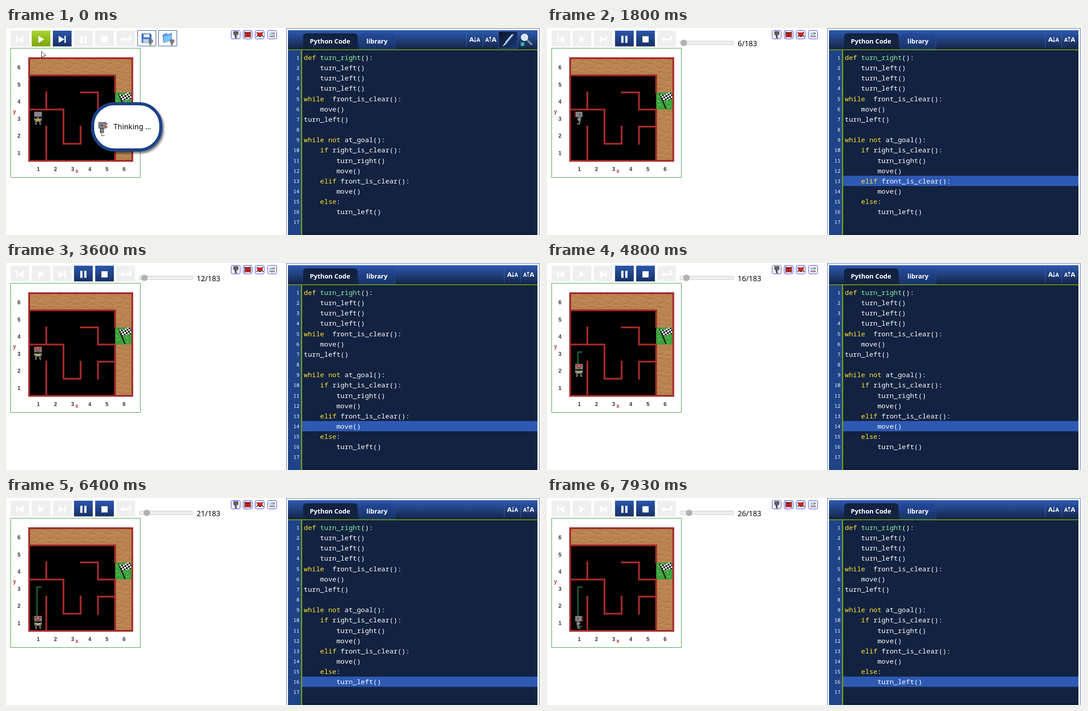
Animation of 1201 by 466 pixels, one loop 8 s. Source, as an HTML page:

```html
<!DOCTYPE html>
<html lang="en">
<head>
<meta charset="utf-8">
<title>Maze robot</title>
<style>
html, body { margin: 0; width: 100%; height: 100%; overflow: hidden; background: #fff; }
svg { display: block; }
text { white-space: pre; }
.ui { font-family: "Noto Sans", "Open Sans", sans-serif; font-size: 16.4px; fill: #000; }
.tab { font: bold 14.4px "Noto Sans", "Open Sans", sans-serif; fill: #fff; }
.code { font: 15.25px "Noto Sans Mono", "DejaVu Sans Mono", monospace; fill: #fff; }
.num { font: 11px "Noto Sans Mono", "DejaVu Sans Mono", monospace; fill: #fff; text-anchor: end; }
.axis { font: bold 12px "Liberation Sans", Arial, sans-serif; fill: #333; text-anchor: middle; }
.red { fill: #b03434; }
.kw { fill: #ffe135; }
.fn { fill: #90f0a0; }
.wall { fill: none; stroke: #a52a2a; stroke-width: 4; }
.size { font-family: "Noto Sans", "Open Sans", sans-serif; fill: #fff; font-weight: 600; }
</style>
</head>
<body>
<svg width="1201" height="466" viewBox="0 0 1201 466">
<defs>
  <linearGradient id="head" x2="0" y2="1"><stop stop-color="#2d5ab3"/><stop offset="1" stop-color="#122140"/></linearGradient>
  <linearGradient id="blue" x2="0" y2="1"><stop stop-color="#2a56ad"/><stop offset="1" stop-color="#173064"/></linearGradient>
  <linearGradient id="tab" x2="0" y2="1"><stop stop-color="#24499a"/><stop offset="1" stop-color="#183264"/></linearGradient>
  <linearGradient id="lime" x2="0" y2="1"><stop stop-color="#a9d52c"/><stop offset="1" stop-color="#7aa512"/></linearGradient>
  <linearGradient id="pen" x2="1" y2="1"><stop stop-color="#0b1226"/><stop offset="1" stop-color="#1b3a78"/></linearGradient>
  <filter id="shade" x="-20%" y="-20%" width="150%" height="150%"><feDropShadow dx="3" dy="4" stdDeviation="2.5" flood-color="#000" flood-opacity=".55"/></filter>
  <pattern id="dirt" width="38.5" height="38.5" patternUnits="userSpaceOnUse" x="52" y="68">
    <rect width="39" height="39" fill="#ba8551"/>
    <g fill="none" stroke="#a87342" stroke-width="2" stroke-linecap="round" opacity=".75">
      <path d="M2 7q5-4 9 1t8 0M20 13q6-5 13 1M4 20q7 5 13-2M22 25q5-4 12 1M3 32q6-5 11 0t9 1M27 34l7-3M27 5l6-2"/>
    </g>
    <g fill="none" stroke="#c8945f" stroke-width="1.5" opacity=".8"><path d="M3 11q6-3 11 1M22 17q6-4 11 0M6 25q6 3 11-2M24 29q5-3 10 0M12 36l8-2"/></g>
  </pattern>
  <pattern id="check" width="8" height="8" patternUnits="userSpaceOnUse" patternTransform="rotate(12)">
    <path d="M0 0h8v8H0z" fill="#fff"/><path d="M0 0h4v4H0zM4 4h4v4H4z" fill="#111"/>
  </pattern>
  <g id="front">
    <path d="M-6 1h13v7H-6z" fill="#777"/>
    <path d="M-7 0v6M8 0v6M-4 7v7M5 7v7" stroke="#999" stroke-width="2"/>
    <path d="M-6 13.5h4M4 13.5h4" stroke="#b5b5b5" stroke-width="1.6"/>
  </g>
  <g id="south">
    <use href="#front"/>
    <path d="M-8-14h17v12H-8z" fill="#858585" stroke="#4d4d4d"/>
    <circle cx="-3.5" cy="-10" r="2.4" fill="#f01818"/><circle cx="4.5" cy="-10" r="2.4" fill="#f01818"/>
    <path d="M-4-5h9" stroke="#333" stroke-width="1.6"/>
    <path d="M-5 2q5.5 5 11 0" fill="none" stroke="#e5d23c" stroke-width="2"/>
  </g>
  <g id="north">
    <use href="#front"/>
    <path d="M-8-14h17v11H-8z" fill="#858585" stroke="#555"/>
    <path d="M-2-2h5v2h-5z" fill="#888"/>
    <path d="M-4 4l4.5-3L5 4M-4 8l4.5-3L5 8" fill="none" stroke="#e5d23c" stroke-width="1.6"/>
  </g>
  <g id="west">
    <path d="M-2-2h7v9h-7z" fill="#666" stroke="#444"/>
    <path d="M-4 2h8M1 0v8" stroke="#aaa" stroke-width="1.4"/>
    <path d="M2 7v6h-6" fill="none" stroke="#929292" stroke-width="2.2"/>
    <path d="M-7-14H8v12H-7z" fill="#858585" stroke="#4d4d4d"/>
    <circle cx="2" cy="-8" r="1.6" fill="#333"/>
    <path d="M-10-11h3M-10-5h3" stroke="#e42525" stroke-width="2.2"/>
  </g>
  <g id="east"><use href="#west" transform="scale(-1 1)"/></g>
  <g id="down">
    <text class="size" x="0" y="31" font-size="15">A</text><path d="M13 20v11m-2.5-3l2.5 3 2.5-3" fill="none" stroke="#fff" stroke-width="1.2"/><text class="size" x="16.5" y="31" font-size="11.5">A</text>
    <text class="size" x="36" y="31" font-size="11.5">A</text><path d="M47 31V20m-2.5 3l2.5-3 2.5 3" fill="none" stroke="#fff" stroke-width="1.2"/><text class="size" x="50.5" y="31" font-size="15">A</text>
    <path d="M-6.5 10v34M30.5 10v34" stroke="#3a62b4"/>
  </g>
</defs>

<g id="bar"></g>

<g id="files">
  <g fill="#fff" stroke="#1f4388"><path d="M295.500 5.500h41v35h-41zM342.500 5.500h41v35h-41z"/></g>
  <path d="M305 13h19l2 2v18h-21z" fill="#3e78c9" stroke="#24519b"/><path d="M309 14h13v7h-13z" fill="#e8eef8"/><path d="M308 25h14v8h-14z" fill="#b9d3f2"/>
  <path d="M352 16l8-4 3 3 9-3v15l-18 6z" fill="#4c9ae0" stroke="#2a6db8"/><path d="M354 19l19-5-2 13-17 6z" fill="#7dc0f3"/>
  <use href="#east" transform="translate(325 34) scale(.55)"/><use href="#east" transform="translate(373 34) scale(.55)"/>
</g>

<g id="progress">
  <rect x="298" y="29.500" width="122" height="8" rx="4" fill="#efefef" stroke="#c8c8c8"/>
  <circle id="thumb" cy="33.500" r="7.300" fill="#b2b2b2"/>
  <text id="count" class="ui" x="428" y="41"></text>
</g>

<g id="chips">
  <g fill="#fff" stroke="#2222e0"><rect x="505.500" y="5.500" width="20" height="19" rx="3"/><rect x="532.500" y="5.500" width="20" height="19" rx="3"/><rect x="559.500" y="5.500" width="20" height="19" rx="3"/><rect x="587.500" y="5.500" width="20" height="19" rx="3"/></g>
  <path d="M511 8h10v7h-10z" fill="#666" stroke="#222"/><path d="M515 15v7h4M513 18h6" fill="none" stroke="#333" stroke-width="2"/>
  <path d="M537 9h11v12h-11z" fill="#d22"/><path d="M536 8v14M549 8v14M538 12h9M541 17h5" stroke="#222" stroke-width="2" stroke-dasharray="3 1"/>
  <path d="M564 10h12v8h-12z" fill="#d92222"/><path d="M562 10l3 2M577 9l-3 3M562 20l4-3M578 20l-4-3M567 19h6" stroke="#333" stroke-width="2"/>
  <path d="M591 11l11-3 2 4-4 3h-9z" fill="#9cc8dc"/><path d="M591 16h13v4h-13z" fill="#a6b8c4"/><path d="M592 20h11M599 14l5-2" stroke="#b85050" stroke-width="1.5"/>
</g>

<g id="world">
  <path d="M10.500 45.500h291v291h-291z" fill="#fff" stroke="#2a962a"/>
  <path d="M52 68h231.500v231H52z" fill="url(#dirt)"/>
  <path d="M52 106.500h193V299H52z"/>
  <path d="M245 145h38.500v38.500H245z" fill="#3da03d"/>
  <path d="M248 152l5 3M268 166l7 4M250 174l6-3M270 178l6-2M247 164l6 2" stroke="#62bd55" stroke-width="2"/>
  <path d="M253 148l14 34" stroke="#111" stroke-width="2.500"/>
  <path d="M253 148q8 6 15 0t13 1l1 12q-6-3-12 1t-12-1z" fill="url(#check)"/>
  <path class="wall" d="M52 68h231.500v231H52zM52 106.500h193V147M245 181.500V299M166 145h40.500v38.500H245M90.500 143v40.500M52 183.500h77v77h38.500V220M206.500 262.500V222H245M90.500 220v79"/>
  <g id="labels"></g>
  <path id="trace" fill="none" stroke="#2e8b57" stroke-width="2"/>
  <use id="robot"/>
</g>

<g id="editor">
  <path d="M629.500 466V.5h568V466" fill="none" stroke="#3c62aa"/>
  <path d="M633 5h560v461H633z" fill="#122240"/>
  <path d="M633 5h560v45H633z" fill="url(#head)"/>
  <path d="M794 48V20q0-8 8-8h63q8 0 8 8v28z" fill="url(#tab)" stroke="#264e9c"/>
  <path d="M633 49h560" stroke="#6d9a14" stroke-width="2"/>
  <path d="M667 51V20q0-8 8-8h106q8 0 8 8v30z" fill="#122240"/>
  <path d="M667 49h122" stroke="#6d9a14" stroke-width="2"/>
  <text class="tab" x="682" y="35">Python Code</text><text class="tab" x="809" y="35">library</text>
  <path d="M633 50h29v416h-29z" fill="#1f4388"/>
  <path d="M663.500 50v416" stroke="#6d9a14" stroke-width="3"/>
  <path d="M665 463h528" stroke="#0b1730" stroke-width="2"/>
  <rect id="mark" x="665" width="528" height="23.150" fill="#2d59b3"/>
  <g id="lines"></g>
  <use id="sizes" href="#down"/>
  <g id="tools">
    <path d="M1106 8h42v38h-42z" fill="url(#pen)" stroke="#31569f"/>
    <path d="M1116 41l5-9 15-18 4-1-1 4-15 18z" fill="#6f9de0"/><path d="M1121 33l15-18" stroke="#dbe9ff" stroke-width="2"/><path d="M1114 42l6-8 3 2z" fill="#e8e8e8"/>
    <path d="M1169 26l12 12" stroke="#8c8c8c" stroke-width="4"/><circle cx="1164" cy="21" r="7" fill="#cfe8f8" stroke="#eee" stroke-width="2.500"/>
    <rect x="1155" y="32" width="9" height="9" rx="2" fill="#1c9a84"/><path d="M1159.500 34v5" stroke="#fff" stroke-width="1.300"/>
  </g>
</g>

<g id="dialog">
  <rect x="194.500" y="170.500" width="153" height="104" rx="49" fill="#fff" stroke="#1f4388" stroke-width="7" filter="url(#shade)"/>
  <use href="#east" transform="translate(217 228) scale(1.100)"/>
  <text class="ui" x="241.500" y="228">Thinking ...</text>
</g>
<path id="cursor" d="M0 0v13.500l3.200-3 2.300 5.200 2.300-1-2.300-5H10z" fill="#fff" stroke="#222"/>
</svg>

<script>
const $ = id => document.getElementById(id);
const LOOP = 8000, START = 70, PITCH = 23.15, CELL = 38.5;

const source = `def turn_right():
    turn_left()
    turn_left()
    turn_left()
while  front_is_clear():
    move()
turn_left()

while not at_goal():
    if right_is_clear():
        turn_right()
        move()
    elif front_is_clear():
        move()
    else:
        turn_left()
`.split("\n");

const paint = s => s
  .replace(/\b(def|while|not|if|elif|else)\b/g, '<tspan class="kw">$1</tspan>')
  .replace(/(def<\/tspan> )(\w+)/, '$1<tspan class="fn">$2</tspan>');

$("lines").innerHTML = source.map((s, i) => {
  const y = 72 + i * PITCH;
  return `<text class="num" x="658.500" y="${y - 1}">${i + 1}</text><text class="code" x="668.500" y="${y}">${paint(s)}</text>`;
}).join("");

const label = (x, y, s, c = "") => `<text class="axis ${c}" x="${x}" y="${y}">${s}</text>`;
let labels = label(19, 192, "y", "red") + label(159, 326, "x", "red");
for (let i = 0; i < 6; i++)
  labels += label(72.5 + i * CELL, 321.5, i + 1) + label(29, 285.5 - i * CELL, i + 1);
$("labels").innerHTML = labels;

// Toolbar icons, drawn around the middle of each button
const icons = [
  "M-8-8h3v16h-3zM8-8v16L-5 0z",
  "M-6-8v16L7 0z",
  "M-8-8v16L5 0zM5-8h3v16H5z",
  "M-7-8h5v16h-5zM2-8h5v16H2z",
  "M-7-7H7V7H-7z",
  "M12-8v10H-5v4l-8-6 8-6v4H8v-6z"
];
$("bar").innerHTML = icons.map((d, i) =>
  `<g transform="translate(${31.2 + i * 47.5} 23.500)"><rect x="-21" y="-17.500" width="42" height="35.500"/><path fill="#fff" transform="translate(0 2)" d="${d}"/></g>`).join("");
const faces = [...$("bar").querySelectorAll("rect")];
const idle = { 1: "url(#lime)", 2: "url(#blue)" };
const busy = { 3: "url(#blue)", 4: "url(#blue)" };

// Each step: time, highlighted line; its index is the counter
const steps = [
  [70, 1], [330, 5], [600, 7], [870, 9], [1130, 9], [1470, 10], [1800, 13],
  [2070, 15], [2330, 16], [2670, 9], [3000, 10], [3270, 13], [3600, 14],
  [3870, 9], [4200, 10], [4530, 13], [4800, 14], [5130, 9], [5470, 10],
  [5730, 13], [6070, 15], [6400, 16], [6670, 9], [7000, 10], [7330, 13],
  [7600, 15], [7930, 16]
];
const show = (id, on) => $(id).setAttribute("visibility", on ? "visible" : "hidden");
const set = (id, o) => { for (const k in o) $(id).setAttribute(k, o[k]); };

function draw(t) {
  const n = steps.findLastIndex(s => t >= s[0]);
  const run = n >= 0;
  faces.forEach((f, i) => f.setAttribute("fill", (run ? busy : idle)[i] || "#efefef"));
  ["files", "tools", "dialog"].forEach(id => show(id, !run));
  show("progress", run);
  show("mark", run);
  set("sizes", { transform: `translate(${run ? 1125 : 1040} 0)` });
  if (run) {
    set("mark", { y: 54.8 + (steps[n][1] - 1) * PITCH });
    set("thumb", { cx: 303.6 + n * 0.59 });
    $("count").textContent = n + "/183";
  }

  const way = n < 3 ? "north" : n < 9 ? "west" : n < 22 ? "south" : "east";
  const y = 202.7 + ((n >= 13) + (n >= 17)) * CELL;
  set("robot", { href: "#" + way, transform: `translate(71.300 ${y})` });
  set("trace", { d: n < 9 ? "" : `M80 200.500H69.500V${way === "east" ? "289H79" : y - 2}` });

  const p = Math.min(1, Math.max(0, (t - START) / 730));
  const e = p * p * (3 - 2 * p);
  set("cursor", { transform: `translate(${79.5 - 20 * e} ${52.5 + 420 * e})` });
}

function tick() {
  draw(performance.now() % LOOP);
  requestAnimationFrame(tick);
}
tick();
</script>
</body>
</html>
```
